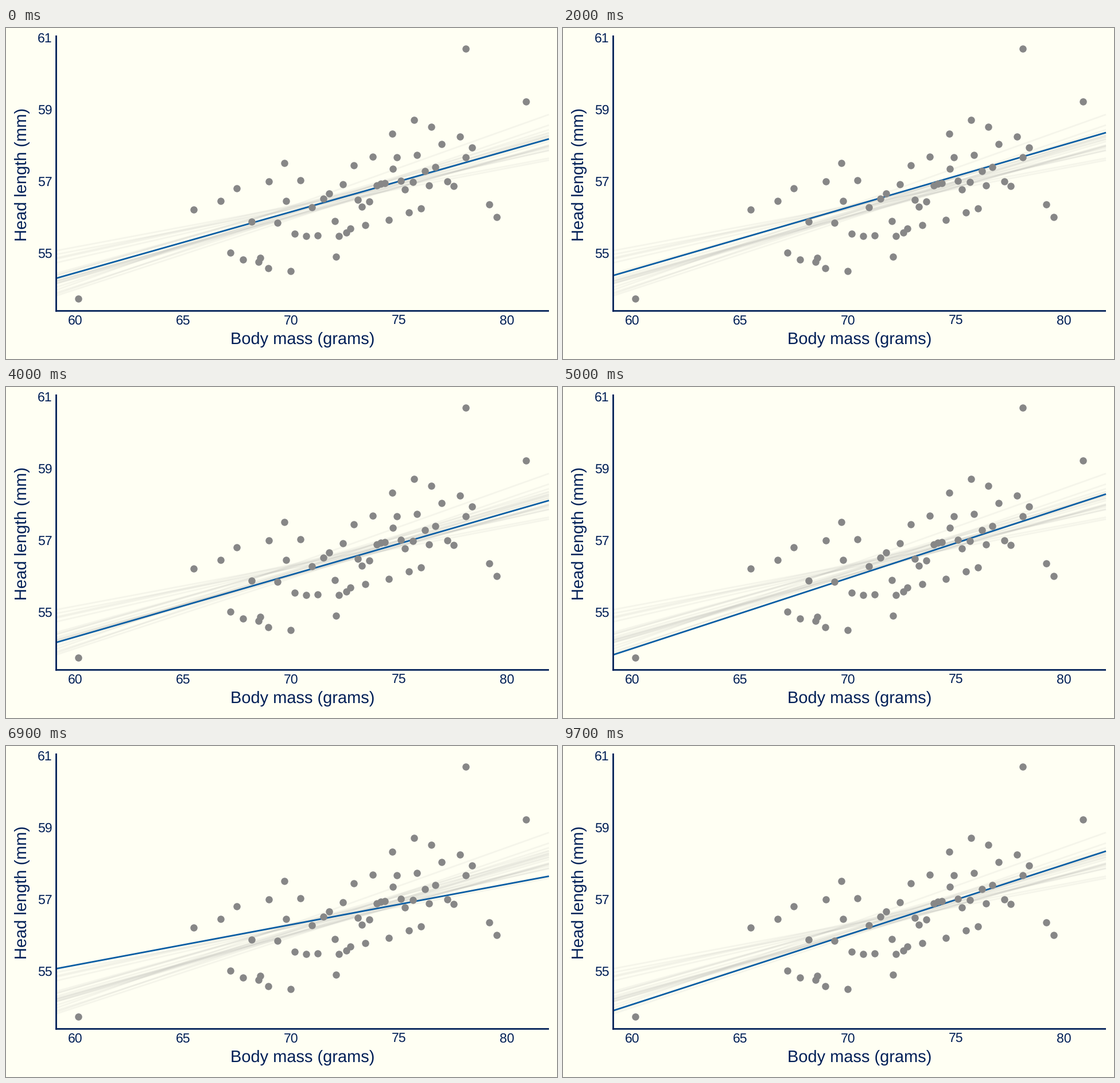
These frames come from a looping animation (960 px wide and 576 px high, 10000 ms). A matplotlib script:

```python
import matplotlib.pyplot as plt
import numpy as np
from matplotlib.animation import FuncAnimation

plt.rcParams["font.family"] = "Liberation Sans"
plt.rcParams["text.hinting"] = "none"
plt.rcParams["text.hinting_factor"] = 1

W, H, DPI = 960, 576, 72  # at 72 dpi one point is one pixel
PAPER, NAVY, BLUE, GRAY = "#fffff3", "#001f57", "#0b5ea4", "#878787"
LEFT, RIGHT, TOP, BOTTOM = 87.5, 946, 13, 492.3
TICK_SIZE, TITLE_SIZE = 22.9, 29.1

# Key poses of the trend line: its height at the left and right panel edge
POSES = [
    (435.5, 193), (402, 213), (463, 169), (444, 190), (430.7, 182), (451, 177), (430, 187),
    (456, 150.5), (444.5, 197.5), (441, 194), (466, 186.3), (440, 204), (394, 230), (427, 189),
    (387.5, 226.6), (438, 206), (408.5, 212.8), (400, 209), (445, 204), (441, 206), (460.5, 183),
]

# Birds that stand apart from the main cloud
OUTLIERS = [
    (126, 470.5), (326.5, 316), (373.5, 301), (402, 278.5), (390.5, 390.5), (439.5, 406.5),
    (456.5, 418), (496, 422.5), (484.5, 235), (575, 398), (672.5, 184), (710.5, 159.5),
    (740.5, 172), (800.5, 36), (842, 307), (855, 329), (906, 128),
]


def bird_cloud(count=45, seed=4):
    """Masses bunch up around 74 g; head lengths scatter around the trend."""
    rng = np.random.default_rng(seed)
    x = np.interp(np.linspace(0, 1, count), [0, 0.14, 0.3, 0.55, 0.84, 1],
                  [413, 505, 575, 647, 737, 812])
    middle = np.interp(x, (LEFT, RIGHT), POSES[0])
    return x, middle + rng.uniform(-75, 68, count)


def pose_start(k):
    """Each pose holds five frames, with a few later ones cut short."""
    return 5 * k - (k > 10) - max(0, k - 18)


fig = plt.figure(figsize=(W / DPI, H / DPI), dpi=DPI, facecolor=PAPER)
ax = fig.add_axes([0, 0, 1, 1])
ax.set(xlim=(0, W), ylim=(H, 0))
ax.axis("off")


def segment(xs, ys, color, **style):
    return ax.plot(xs, ys, color=color, lw=2.8, solid_capstyle="butt", snap=False, **style)[0]


def label(x, y, text, size, **style):
    ax.text(x, y, text, color=NAVY, fontsize=size, ha="center", va="baseline", **style)


for pose in POSES:
    segment((LEFT, RIGHT), pose, "#7f7f7f", alpha=0.07, zorder=1)
trend = segment((LEFT, RIGHT), POSES[0], BLUE, zorder=2)
for xs, ys in (bird_cloud(), zip(*OUTLIERS)):
    ax.scatter(xs, ys, s=12.5 ** 2, color=GRAY, linewidths=0, zorder=3)

segment((LEFT, LEFT), (TOP, BOTTOM + 1.4), NAVY, zorder=4)
segment((LEFT - 1.4, RIGHT), (BOTTOM, BOTTOM), NAVY, zorder=4)
for i in range(5):
    label(120.4 + 188 * i, 516, str(60 + 5 * i), TICK_SIZE)
for i in range(4):
    label(68, 25 + 125.2 * i, str(61 - 2 * i), TICK_SIZE)
label(516.5, 550, "Body mass (grams)", TITLE_SIZE)
label(36, 254.5, "Head length (mm)", TITLE_SIZE, rotation=90, rotation_mode="anchor")


def update(frame):
    k = max(k for k in range(len(POSES)) if pose_start(k) <= frame)
    ends = np.array(POSES[k])
    # The last changes pass through a halfway line
    if 17 <= k < 20 and frame == pose_start(k + 1) - 1:
        ends = (ends + POSES[k + 1]) / 2
    trend.set_ydata(ends)
    return (trend,)


anim = FuncAnimation(fig, update, frames=100, interval=100, repeat=True, repeat_delay=0)
plt.show()
```
